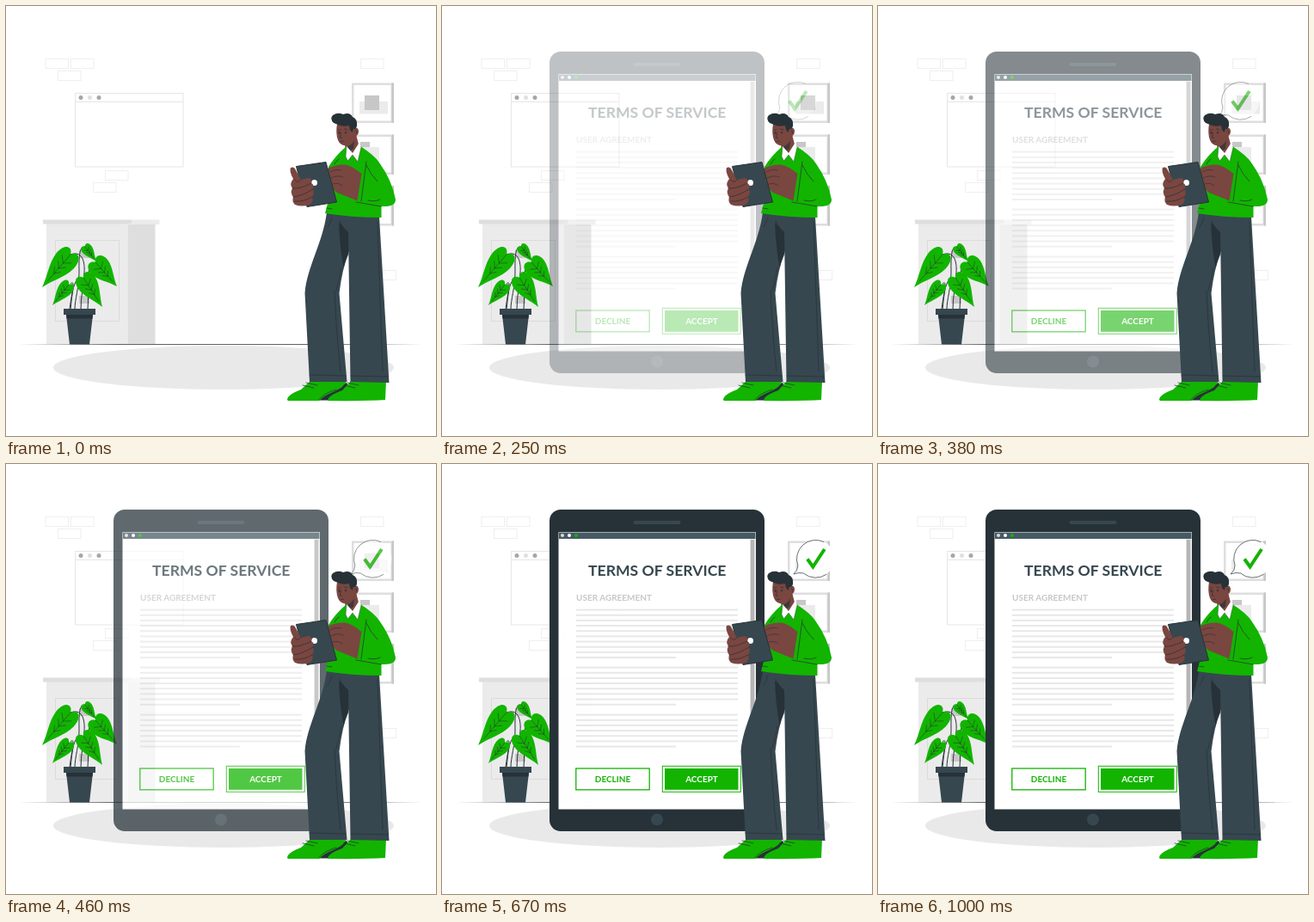
Write an HTML page that moves like this. It is 500 by 500 pixels and loops after 1.04 s.

```html
<!DOCTYPE html>
<html lang="en">
<head>
<meta charset="utf-8">
<title>Terms of service</title>
<style>
  html, body { margin: 0; width: 100%; height: 100%; overflow: hidden; background: #fff; }
  svg { display: block; width: 100vw; height: 100vh; }
  text { font-family: Lato, "Open Sans", sans-serif; font-weight: 700; font-size: 10px; }
  .ink { fill: none; stroke: #263238; stroke-width: .7; stroke-linecap: round; stroke-linejoin: round; }
  .dark { fill: #263238; }
  .slate { fill: #37474f; }
  .green { fill: #12b400; }
  .skin { fill: #7a4640; }
  .pale { fill: #ebebeb; }
  .mid { fill: #dedede; }
  .grey { fill: #c7c7c7; }
  .edge { fill: none; stroke: #e6e6e6; stroke-width: 1; }
  .brick { fill: none; stroke: #efefef; stroke-width: 1; }
  .white { fill: #fff; }
</style>
</head>
<body>
<svg viewBox="0 0 500 500">
  <g id="bricks"></g>

  <g id="window">
    <rect class="edge" x="80.5" y="101.5" width="125.5" height="85.5"/>
    <path class="edge" d="M80.5 111.5H206"/>
    <circle cx="87" cy="106.5" r="2.5" fill="#a6a6a6"/>
    <circle cx="97.5" cy="106.5" r="2.5" fill="#e0e0e0"/>
    <circle cx="108" cy="106.5" r="2.5" fill="#a6a6a6"/>
  </g>

  <g id="pictures"></g>

  <g id="cabinet">
    <path class="pale" d="M47 253H141.500V393H47ZM146 248.500H178.500V254H146Z"/>
    <path class="mid" d="M141.500 254H173.500V393H141.500ZM43 248.500H146V253.500H43Z"/>
    <rect x="57.500" y="272.500" width="74" height="94" fill="none" stroke="#dbdbdb"/>
    <path class="grey" d="M85 284H97V293H85ZM85 337H97V346H85Z"/>
  </g>

  <ellipse cx="253" cy="420.5" rx="198" ry="25.5" fill="#e9e9e9"/>
  <path class="dark" d="M15 393.600L130 393.200H370L484 393.600L370 394H130Z"/>

  <g id="plant">
    <path class="ink" style="stroke-width:1" d="M75 289C88 284 92 296 91 310C90 325 87 338 87 353M92 280C84 278 85 296 85 310C85 328 80 340 80 353M104 299C92 297 97 325 95 353M75 323C82 315 75 340 74 353M90 317C78 312 77 335 75 353"/>
  </g>
  <path class="slate" d="M67 352H104V359H101L97 393.500H74L70 359H67Z"/>
  <path class="dark" d="M70 359H101L100.500 363.500H70.500Z"/>

  <g id="tablet" opacity="0">
    <rect class="dark" x="125" y="53" width="250" height="374" rx="13"/>
    <rect class="slate" x="222.500" y="66" width="55" height="4" rx="2"/>
    <circle class="slate" cx="250" cy="413.500" r="7"/>
    <rect class="white" x="135.500" y="79.300" width="229.500" height="322.200"/>
    <rect x="136" y="79.800" width="228.500" height="7.200" fill="#455a64"/>
    <circle cx="140" cy="83" r="2" fill="#dbdbdb"/>
    <circle cx="148" cy="83" r="2" fill="#fff"/>
    <circle class="green" cx="156" cy="83" r="2"/>
    <rect class="pale" x="358" y="87" width="6.500" height="314"/>
    <rect x="358.800" y="88" width="4.500" height="212" fill="#b5b5b5"/>
    <text class="slate" x="250.200" y="129.500" text-anchor="middle" style="font-size:17.6px">TERMS OF SERVICE</text>
    <text x="156" y="159.300" fill="#c7c7c7">USER AGREEMENT</text>
    <g id="lines" fill="#e8e8e8"></g>
    <g fill="none" stroke="#12b400">
      <rect x="155.800" y="354" width="85.400" height="24.800" stroke-width="1.300"/>
      <rect x="256.300" y="351.300" width="91" height="30"/>
    </g>
    <rect class="green" x="259" y="354" width="85.500" height="24.800"/>
    <text class="green" x="198.500" y="369.800" text-anchor="middle">DECLINE</text>
    <text class="white" x="302" y="369.800" text-anchor="middle">ACCEPT</text>
  </g>

  <g id="bubble" opacity="0">
    <path class="white" d="M412 128Q417 124 417 118A22 22 0 1 1 423.500 127Q418 125.500 412 128Z"/>
    <path class="ink" d="M447 90.500A22 22 0 0 0 417 118Q417 124 412 128Q418 125.500 423.500 127A22 22 0 0 0 450 128.500"/>
    <path d="M428 110.500L434.500 119.500L448 99" fill="none" stroke="#12b400" stroke-width="4"/>
  </g>

  <g id="man">
    <!-- shoes -->
    <path class="dark" d="M361 458.500L368 449L396 438L399 443L376 458.500Z"/>
    <path class="green" d="M327 458Q327 452 343 446L354 436H396Q394 443 380 449Q370 453 364 459H328Z"/>
    <path class="green" d="M374 459Q374 453 391 447L401 436H442L441 458Q420 459.500 374 459Z"/>
    <path class="ink" d="M364 457.500Q370 450 384 446M345 441L358 444M349 438L362 441M393 441L406 444M397 438L410 441"/>
    <!-- trousers -->
    <path class="slate" d="M373 240C368 277 350 303 347.500 334L353 437L396.500 437L387.500 334Q391 305 398 289L402 244Z"/>
    <path class="dark" d="M387 252L399 262V285Q395 294 392.500 304Q388 280 387 252Z"/>
    <path class="slate" d="M386 242L434 245L445.500 438L400.500 437L398 263Q390 258 386 242Z"/>
    <path class="ink" d="M353 429L395 430M401 430L444 431M432 250L438 425M379 246Q377 253 374 257M382 331Q384 380 389 425M384 331Q388 315 390 305M397 262Q391 258 388 250"/>
    <!-- head -->
    <path class="skin" d="M393 158L407 149L411 165L400 178L395 166Z"/>
    <path class="dark" d="M396 164Q402 162 405 156L404 166L398 169Z" opacity=".7"/>
    <path class="skin" d="M385 137Q383 148 386 156Q389 163 396 162Q404 159 406 151Q410 151 410 145Q409 140 405 142L404 135Z"/>
    <path class="dark" d="M381 136Q376 131 380 127Q386 123 392 126Q400 123 403 129Q409 131 408 140L406 143Q403 142 403 147Q399 144 399 139Q391 141 386 138Z"/>
    <path class="ink" d="M386 144.500L389 143.500M393.500 143L397 144M389.500 147L388.500 153L390.500 153.500M389 157.500Q391 156.500 393 157.500M406 145Q408 144 407.500 148"/>
    <ellipse class="dark" cx="387.500" cy="147.500" rx=".8" ry="1.400"/>
    <ellipse class="dark" cx="395" cy="147.200" rx=".8" ry="1.400"/>
    <!-- sweater -->
    <path class="green" d="M396 163Q383 174 375 187L376 222L371 241Q402 246 436.500 246V233Q453 234 453 225Q449 203 434 182Q429 174 412 163L404 175Z"/>
    <path class="white" d="M396 163L395 175L397.500 180L403 173L409 181L413 164L410 160L403 171Z"/>
    <path class="ink" d="M396 163L395 175L397.500 180L403 173L409 181L413 164" style="stroke-width:.4"/>
    <path class="ink" d="M419 181L413 227M419 185Q424 196 432 204M407 228L436 233M421 226Q430 228 435 225M373 235L379 236M387 178Q384 180 382 184"/>
    <!-- far hand -->
    <path class="skin" d="M374 189Q383 184 394 184.500Q402 185.500 413.500 195L408.500 226.500L385 217L376 209Z"/>
    <path class="ink" d="M377 193Q384 189 390 191M378 200Q386 196 392 199M380 207Q387 205 391 209" style="stroke-width:.6"/>
    <!-- handheld -->
    <path class="slate" d="M337.500 186.500L372 181.500L384.500 228L350 233.500Z" stroke="#263238" stroke-linejoin="round"/>
    <circle class="white" cx="358.500" cy="205.500" r="3.500"/>
    <!-- near hand -->
    <path class="skin" d="M331 188Q335 186 337 191L343 202L352 200Q357 201 355 206Q359 208 357 213Q359 218 356 222Q358 228 353 231Q344 234 336 231Q332 227 334 222Q330 217 333 212Q329 207 334 201Q329 192 331 188Z"/>
    <path class="ink" d="M333 212Q342 213 355 206M334 222Q344 221 357 213M336 227Q346 228 356 222M336 202Q338 207 343 202"/>
  </g>
</svg>
<script>
const $ = id => document.getElementById(id);
const put = (id, markup) => $(id).insertAdjacentHTML('beforeend', markup);
const box = (x, y, w, h, cls) => `<rect class="${cls}" x="${x}" y="${y}" width="${w}" height="${h}"/>`;

const bricks = [[46, 61.5], [75.5, 61.5], [60.5, 75.5], [115.5, 191.5], [101.5, 205.5], [412.5, 61.5], [427, 307.5]];
put('bricks', bricks.map(([x, y]) => box(x, y, 26.5, 11, 'brick')).join(''));

for (const y of [89.5, 149.5, 209]) {
  const first = y < 100;
  put('pictures',
    box(402, y, 49, 46.5, 'mid') + box(448.5, y, 2.5, 46.5, 'grey') + box(404.5, y + 2.5, 43, 41.5, 'white') +
    (first
      ? box(411, 111, 33, 14.5, 'pale') + box(417, 104, 17, 17, 'grey')
      : box(411, y + 14.5, 23, 17, 'pale') + box(412, y + 8.5, 11, 6, 'grey')));
}

// Heart-shaped leaf from its notch to its tip
function leaf(x, y, tipX, tipY, width) {
  const len = Math.hypot(tipX - x, tipY - y);
  const turn = Math.atan2(tipY - y, tipX - x) * 180 / Math.PI;
  const p = (a, b) => `${(a * len).toFixed(1)} ${(b * width).toFixed(1)}`;
  const side = s => `C${p(-.18, .15 * s)} ${p(-.12, .52 * s)} ${p(.2, .5 * s)}C${p(.48, .46 * s)} ${p(.72, .14 * s)} ${p(1, 0)}`;
  const veins = [.14, .3, .46].map(a =>
    `M${p(a + .12, 0)}L${p(a, .3 - a * .3)}M${p(a + .12, 0)}L${p(a, a * .3 - .3)}`).join('');
  put('plant', `<g transform="translate(${x} ${y}) rotate(${turn})">
    <path class="green" d="M0 0${side(1)}M0 0${side(-1)}"/>
    <path class="ink" style="stroke-width:.5" d="M0 0L${p(.8, 0)}${veins}"/></g>`);
}
leaf(75, 289, 42, 327, 27);
leaf(92, 280, 105, 297, 13);
leaf(104, 298, 129, 326, 25);
leaf(73, 324, 54, 348, 17);
leaf(90, 316, 112, 350, 24);

for (const [top, count] of [[168.6, 10], [235.6, 8], [290.6, 7]]) {
  for (let i = 0; i < count; i++) {
    put('lines', box(156, top + i * 6.16, i < count - 1 ? 188 : 116, 2, ''));
  }
}

const LOOP = 1040, FADE = 700, STEPS = 25;
const stepTime = k => Math.round(k * 25 / 6) * 10;

function draw(now) {
  const t = now % LOOP;
  let k = STEPS - 1;
  while (k > 0 && stepTime(k) > t) k--;
  const time = k < 2 ? 0 : stepTime(k);

  const u = Math.min(time / FADE, 1);
  const shown = u * u * (3 - 2 * u);
  const sway = time > FADE ? 3 * Math.sin(Math.PI * (time - FADE) / (LOOP - FADE)) : 0;
  $('tablet').setAttribute('opacity', shown);
  $('bubble').setAttribute('opacity', shown);
  $('bubble').setAttribute('transform', `translate(${30 * shown - 33 + sway} 0)`);
}

const start = performance.now();
function tick() {
  draw(performance.now() - start);
  requestAnimationFrame(tick);
}
tick();
</script>
</body>
</html>
```
